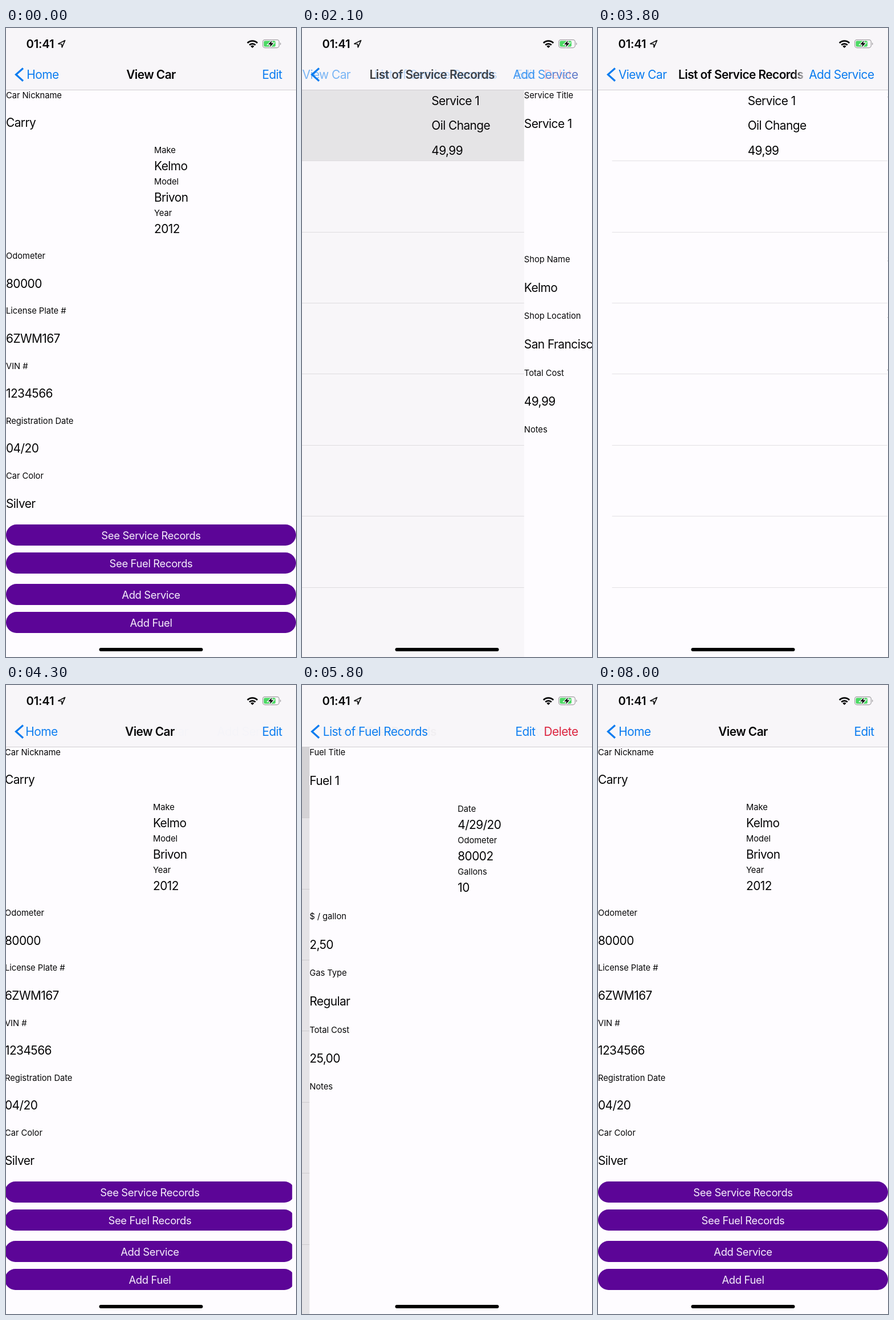
An HTML page that plays this animation: 509x1101 px, repeating every 8.1 s.

```html
<!DOCTYPE html>
<html lang="en">
<head>
<meta charset="utf-8">
<title>Car records</title>
<style>
html, body { margin: 0; width: 100%; height: 100%; overflow: hidden; background: #fefcff; }
#stage { position: absolute; left: 0; top: 0; width: 509px; height: 1101px; overflow: hidden;
  font-family: Inter, Roboto, sans-serif; color: #060607; }
#stage div, #stage svg { position: absolute; }
.page, .dim, .layer { left: 0; top: 0; width: 509px; height: 1101px; }
.page { background: #fefcff; overflow: hidden; }
.dim { background: #000; }
.t { height: 30px; line-height: 30px; white-space: pre; }
.label { font-size: 14.75px; letter-spacing: -.05px; }
.value, .bar { font-size: 20.9px; letter-spacing: -.57px; }
.bar { color: #0a7cf0; }
.title { color: #060607; font-weight: 600; }
.red { color: #dc1f3a; }
.clock { font-size: 20.3px; font-weight: 600; letter-spacing: -.2px; }
.btn { left: 0; width: 509px; height: 37px; border-radius: 18.5px; background: #5c0597; }
.btn .t { top: 3.5px; left: 0; width: 509px; text-align: center; color: #f6eefb;
  font-size: 18.44px; letter-spacing: -.36px; }
.line { left: 24.5px; right: 0; height: 1px; background: #e3e1e4; }
.row { left: 0; top: 109px; width: 509px; height: 124px; background: #ebe9ec; }
#nav { left: 0; top: 0; width: 509px; height: 108px; background: #f8f6f9;
  border-bottom: 1px solid #d0ced1; overflow: hidden; }
</style>
</head>
<body>
<div id="stage"></div>
<script>
const W = 509, LOOP = 8100, OMEGA = 18;
const stage = document.getElementById('stage');

function box(parent, cls, css = {}) {
  const el = document.createElement('div');
  el.className = cls;
  Object.assign(el.style, css);
  parent.append(el);
  return el;
}
function text(parent, str, cls, y, css) {
  const el = box(parent, 't ' + cls, { top: y - 15 + 'px', ...css });
  el.textContent = str;
  return el;
}
const at = (parent, str, cls, x, y) => text(parent, str, cls, y, { left: x + 'px' });

// label/value pairs: one on top, three in the right column, the rest below
function fields(page, pairs, top, gap, colY, restY, step) {
  pairs.forEach(([label, value], i) => {
    const mid = i > 0 && i < 4;
    const x = mid ? 260 : 0;
    const y = i === 0 ? top : mid ? colY + (i - 1) * 55 : restY + (i - 4) * step;
    at(page, label, 'label', x, y);
    at(page, value, 'value', x, y + (mid ? 27.8 : gap));
  });
}

function carPage(page) {
  fields(page, [['Car Nickname', 'Carry'], ['Make', 'Kelmo'], ['Model', 'Brivon'], ['Year', '2012'],
    ['Odometer', '80000'], ['License Plate #', '6ZWM167'], ['VIN #', '1234566'],
    ['Registration Date', '04/20'], ['Car Color', 'Silver']], 117.5, 48.6, 213.8, 399, 96.25);
  const names = ['See Service Records', 'See Fuel Records', 'Add Service', 'Add Fuel'];
  return { buttons: [869, 918, 973.3, 1022.3].map((y, i) =>
    text(box(page, 'btn', { top: y + 'px' }), names[i], '', 18.5)) };
}
function detailPage(pairs) {
  return page => {
    fields(page, pairs, 117.5, 50.4, 217, 404.5, 99.5);
    return {};
  };
}
function listPage(items) {
  return page => {
    const lines = (parent, first, step, n) => {
      for (let i = 0; i < n; i++) box(parent, 'line', { top: Math.round(first + i * step - .5) + 'px' });
    };
    const empty = box(page, 'layer'), full = box(page, 'layer');
    lines(empty, 162, 54.07, 17);
    const row = box(full, 'row');
    lines(full, 232.7, 124.4, 7);
    items.forEach((s, i) => at(full, s, 'value', 263, 127.5 + i * 43.5));
    return { empty, full, row };
  };
}

const specs = {
  car: { build: carPage, back: 'Home', title: 'View Car', cx: 254.5, shift: 174, right: ['Edit'], edge: 442 },
  services: { build: listPage(['Service 1', 'Oil Change', '49,99']), back: 'View Car',
    title: 'List of Service Records', cx: 251, shift: 102, right: ['Add Service'], edge: 367 },
  service: { build: detailPage([['Service Title', 'Service 1'], ['Date', '4/29/20'], ['Odometer', '80001'],
    ['Service Type', 'Oil Change'], ['Shop Name', 'Kelmo'], ['Shop Location', 'San Francisco'],
    ['Total Cost', '49,99'], ['Notes', '']]),
    back: 'List of Service Records', title: '', cx: 254, shift: 0, right: ['Delete', 'Edit'], edge: 367 },
  fuels: { build: listPage(['Fuel 1', 'Regular', '25,00']), back: 'View Car',
    title: 'List of Fuel Records', cx: 254.5, shift: 121, right: ['Add Fuel'], edge: 397 },
  fuel: { build: detailPage([['Fuel Title', 'Fuel 1'], ['Date', '4/29/20'], ['Odometer', '80002'],
    ['Gallons', '10'], ['$ / gallon', '2,50'], ['Gas Type', 'Regular'],
    ['Total Cost', '25,00'], ['Notes', '']]),
    back: 'List of Fuel Records', title: '', cx: 254, shift: 0, right: ['Delete', 'Edit'], edge: 367 }
};

// start, lower page, upper page, push or pop
const moves = [
  [1123, 'car', 'services', 'push'],
  [2050, 'services', 'service', 'push'],
  [3340, 'services', 'service', 'pop'],
  [3950, 'car', 'services', 'pop'],
  [4480, 'car', 'fuels', 'push'],
  [5494, 'fuels', 'fuel', 'push'],
  [6340, 'fuels', 'fuel', 'pop'],
  [6950, 'car', 'fuels', 'pop']
];

const pages = {};
for (const id in specs) {
  const el = box(stage, 'page');
  pages[id] = { ...specs[id], el, ...specs[id].build(el), dim: box(el, 'dim') };
}
const nav = box(stage, '');
nav.id = 'nav';
for (const p of Object.values(pages)) {
  p.bar = box(nav, 'layer');
  const fade = box(p.bar, 'layer');
  fade.style.maskImage = fade.style.webkitMaskImage =
    `linear-gradient(90deg, #000 ${p.edge - 24}px, transparent ${p.edge}px)`;
  p.titleEl = text(fade, p.title, 'bar title', 81.5,
    { left: p.cx - 300 + 'px', width: '600px', textAlign: 'center' });
  p.backEl = at(p.bar, p.back, 'bar', 36.3, 81.5);
  p.rightEl = box(p.bar, 'layer');
  p.right.forEach((s, i) => text(p.rightEl, s, 'bar' + (s === 'Delete' ? ' red' : ''), 81.5,
    { right: (i ? 99.5 : 24.5) + 'px' }));
}
at(stage, '01:41', 'clock', 35.5, 28);
stage.insertAdjacentHTML('beforeend', `
<svg width="509" height="1101" style="left:0;top:0" fill="none">
  <path d="M30 70.5L17.5 81.5L30 92.8" stroke="#0a7cf0" stroke-width="3.2"/>
  <path d="M103.6 21.8L91.8 27.6L97.7 28.2L98.3 34Z" stroke="#060607" stroke-width="1.6" stroke-linejoin="round"/>
  <g stroke="#060607" stroke-width="2.8">
    <path d="M423.8 26.3A12.2 12.2 0 0 1 441.2 26.3"/>
    <path d="M427.2 29.8A7.5 7.5 0 0 1 437.8 29.8"/>
  </g>
  <path d="M432.5 35L429.4 31.9A4.4 4.4 0 0 1 435.6 31.9Z" fill="#060607"/>
  <rect x="450.6" y="20.6" width="28.8" height="14" rx="4" stroke="#a3a1a4" stroke-width="1.2"/>
  <path d="M481 25.3a2.6 2.6 0 0 1 0 4.8z" fill="#a3a1a4"/>
  <rect x="452.4" y="22.4" width="20.6" height="10.4" rx="2.4" fill="#4cd964"/>
  <path d="M467 21.8L460 28.8H464.3L462.6 33.8L469.7 26.4H465.4Z" fill="#060607"
    stroke="#fefcff" stroke-width="2.4" paint-order="stroke"/>
  <rect x="163.5" y="1085" width="182" height="6" rx="3" fill="#000"/>
</svg>`);

const clamp = v => Math.max(0, Math.min(1, v));
const slide = (el, x) => { el.style.transform = `translateX(${x}px)`; };
const show = (el, on) => { el.style.visibility = on ? 'inherit' : 'hidden'; };
const pressed = (t, down, up) => t < down ? 1 : .3 + .7 * clamp((t - up) / 200);

function list(p, t, load, tap, pop) {
  show(p.empty, t < load);
  show(p.full, t >= load);
  p.row.style.opacity = t < tap ? 0 : 1 - clamp((t - pop) / 300);
}

function draw(t) {
  const done = moves.filter(m => m[0] <= t);
  const [start, low, up, kind] = done[done.length - 1] || [0, 'car', 'services', 'pop'];
  const s = done.length ? (t - start) / 1000 * OMEGA : 99;
  let rest = (1 + s) * Math.exp(-s);
  if (rest < .0015) rest = 0;
  const q = kind === 'push' ? rest : 1 - rest, p = 1 - q;
  const a = pages[low], b = pages[up];

  for (const pg of Object.values(pages)) {
    const on = (pg === a && q > 0) || (pg === b && p > 0);
    show(pg.el, on);
    show(pg.bar, on);
  }
  slide(a.el, -.3 * W * p);
  a.dim.style.opacity = .1 * p;
  slide(b.el, W * q);
  b.dim.style.opacity = 0;

  slide(a.titleEl, -.95 * a.shift * p);
  slide(a.backEl, -.3 * W * p);
  slide(b.titleEl, .5 * W * q);
  slide(b.backEl, 1.16 * a.shift * q * Math.min(1, 6 * q));
  const next = moves.find(m => m[0] > t);
  const tapBack = next && next[3] === 'pop' && next[0] - t <= 50;
  a.titleEl.style.opacity = a.rightEl.style.opacity = q;
  a.backEl.style.opacity = clamp(1 - 2 * p);
  b.titleEl.style.opacity = b.rightEl.style.opacity = p;
  b.backEl.style.opacity = tapBack ? .3 : p;

  pages.car.buttons[0].style.opacity = pressed(t, 1000, 1200);
  pages.car.buttons[1].style.opacity = pressed(t, 4430, 4560);
  list(pages.services, t, 1720, 1950, 3340);
  list(pages.fuels, t, 5080, 5440, 6340);
}

function frame() {
  draw(performance.now() % LOOP);
  requestAnimationFrame(frame);
}
frame();
</script>
</body>
</html>
```
